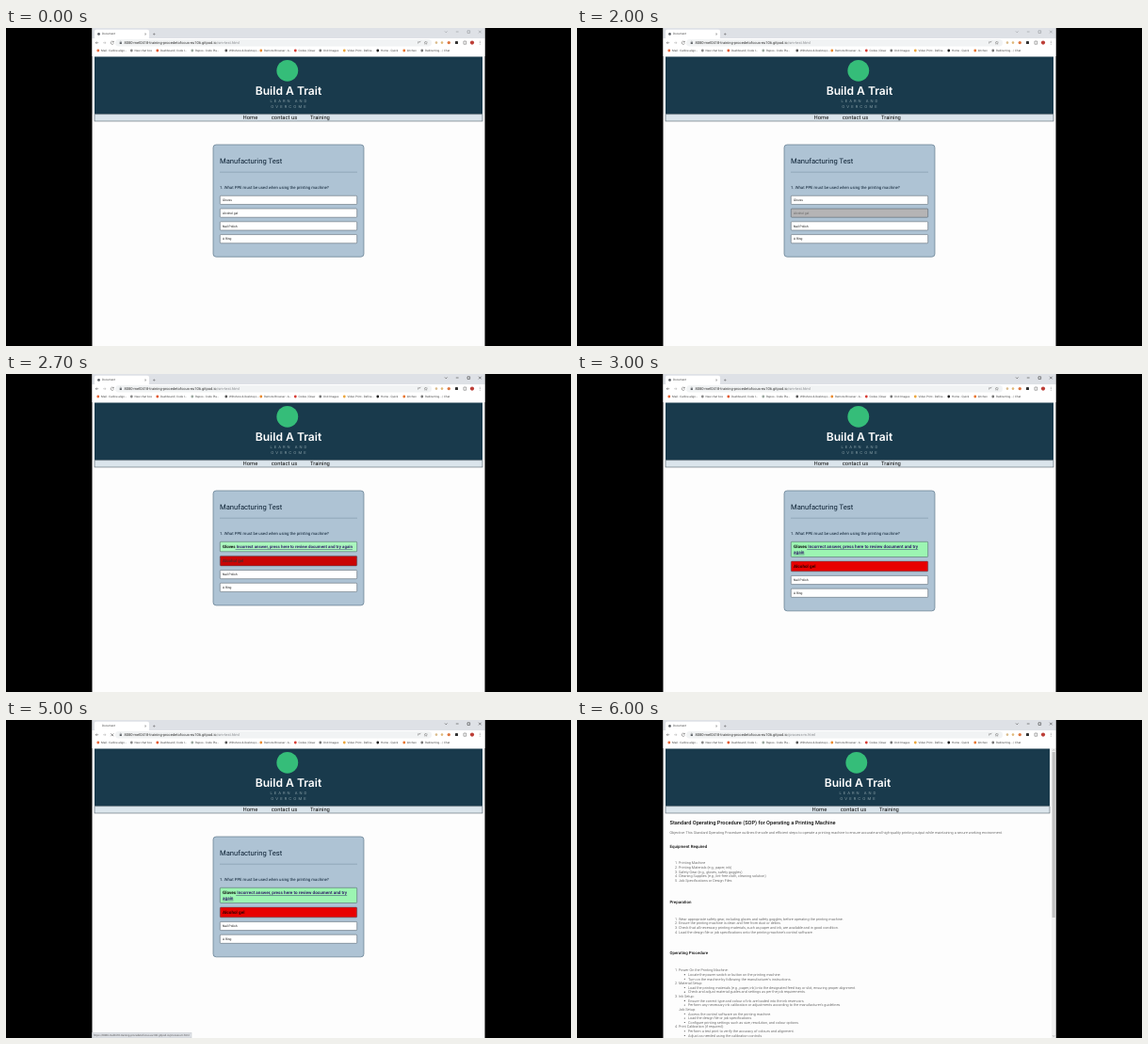
These frames come from a looping animation (600x338 px, 7.4 s). An HTML page:

```html
<!DOCTYPE html>
<html lang="en">
<head>
<meta charset="utf-8">
<title>Training quiz</title>
<style>
  html, body { margin: 0; width: 100%; height: 100%; overflow: hidden; background: #000; }
  svg { display: block; width: 100vw; height: 100vh; font-family: Roboto, sans-serif; text-rendering: geometricPrecision; white-space: pre; }
</style>
</head>
<body>
<svg id="stage" viewBox="0 0 600 338"></svg>
<script>
const LOOP = 7400, STEP = 100;
const HOST = "8080-mel0418-training-procedetofocus-eu106.gitpod.io";
const stage = document.getElementById("stage");

const rect = (x, y, w, h, fill, extra = "") =>
  `<rect x="${x}" y="${y}" width="${w}" height="${h}" fill="${fill}" ${extra}/>`;
const dot = (x, y, r, fill) => `<circle cx="${x}" cy="${y}" r="${r}" fill="${fill}"/>`;
const text = (x, y, size, fill, content, extra = "") =>
  `<text x="${x}" y="${y}" font-size="${size}" fill="${fill}" ${extra}>${content}</text>`;
const line = (d, stroke, width = 0.6) =>
  `<path d="${d}" fill="none" stroke="${stroke}" stroke-width="${width}"/>`;

const clamp = v => Math.max(0, Math.min(1, v));
const mix = (a, b, p) => a + (b - a) * p;
const mixColor = (a, b, p) => `rgb(${a.map((v, i) => Math.round(mix(v, b[i], p)))})`;

// CSS "ease": cubic-bezier(.25, .1, .25, 1)
function ease(x) {
  if (x <= 0 || x >= 1) return clamp(x);
  const bezier = (a, b, s) => 3 * a * s * (1 - s) ** 2 + 3 * b * s * s * (1 - s) + s ** 3;
  let low = 0, high = 1;
  for (let i = 0; i < 24; i++) {
    const mid = (low + high) / 2;
    if (bezier(0.25, 0.25, mid) < x) low = mid; else high = mid;
  }
  return bezier(0.1, 1, low);
}

const bookmarks = [
  [96, "#e8683a", "Mail - Carline align..."], [131.5, "#888", "New chat box"],
  [159, "#e2572b", "Dashboard | Code I..."], [196, "#9aa89f", "Repos - Code Pla..."],
  [232, "#555", "Wiltshore &amp; Desktop L..."], [269, "#e98a2e", "Remote Browser - A..."],
  [305.5, "#d63a32", "Codes | Draw"], [332, "#777", "Unit Images"],
  [357.5, "#eba53a", "Video Print - Define..."], [393, "#222", "Home - Quick"],
  [421, "#e8742c", "kitchen"], [440, "#777", "Redirecting... | Chat"]
];

function browser(t) {
  const active = t >= 2400, loading = t >= 5000 && t < 5100;
  const ink = active ? "#222" : "#85888c";
  const path = t >= 5100 ? "process-m.html" : "sm-test.html";
  const reload = loading
    ? line("M111.4 14.4l2.8 2.8m0-2.8l-2.8 2.8", "#444")
    : line("M114 14.7a1.6 1.6 0 1 0 .3 1.6M114.4 13.8v1.3h-1.3", "#555", 0.5);
  return rect(91.5, 0, 417, 338, "#fdfdfd") +
    rect(91.5, 0, 417, 11, "#dee1e6") +
    rect(94, 1.8, 58, 10, "#fff", 'rx="1.8"') +
    (loading ? "" : dot(98.5, 6.4, 1.4, "#5f6368")) +
    text(102, 7.3, 3.05, "#444", "Document") +
    line("M147.2 5.6l1.8 1.8m0-1.8l-1.8 1.8M156 6.5h2.6m-1.3-1.3v2.6", "#555", 0.4) +
    line("M466 3.5l1.3 1.3 1.3-1.3M477.8 4h2.8M490 2.8h2.6v2.6h-2.6zM502 2.7l2.7 2.7m0-2.7l-2.7 2.7", ink, 0.5) +
    rect(91.5, 11, 417, 19, "#fff") +
    rect(116, 12, 336, 7.4, "#f1f3f4", 'rx="3.7"') +
    line("M98.2 15.7h-3m1.3-1.3l-1.3 1.3 1.3 1.3", "#555", 0.5) +
    line("M103 15.7h3m-1.3-1.3l1.3 1.3-1.3 1.3", "#aaa", 0.5) + reload +
    rect(120.7, 15.2, 2.2, 1.8, "#5f6368") + line("M121.2 15.2v-.7a.6.6 0 0 1 1.2 0v.7", "#5f6368", 0.4) +
    text(125.5, 16.9, 4, "#333", `${HOST}<tspan fill="#85888c">/${path}</tspan>`) +
    line("M437.5 16.7v-2h2.6M438.5 15.8l2-2M445.8 14l.5 1.1 1.2.1-.9.8.3 1.2-1.1-.6-1.1.6.3-1.2-.9-.8 1.2-.1z", "#666", 0.4) +
    dot(457, 15.6, 1.3, "#d9bb8b") + dot(463, 15.6, 1.3, "#e0b878") +
    dot(470.3, 15.6, 1.7, "#dc7742") + rect(477, 14, 3, 3, "#333", 'rx=".6"') +
    line("M486 14h2.7v3.2h-2.7z", "#555", 0.5) + dot(495, 15.6, 2.1, "#bc3e37") +
    dot(503.2, 14.1, 0.4, "#444") + dot(503.2, 15.6, 0.4, "#444") + dot(503.2, 17.1, 0.4, "#444") +
    bookmarks.map(([x, color, label]) =>
      dot(x + 1.8, 24, 1.4, color) + text(x + 5, 25, 3.05, "#444", label)).join("");
}

function header(right) {
  const center = (94 + right) / 2, width = right - 94;
  const middle = 'text-anchor="middle" font-family="Inter, sans-serif"';
  return rect(94, 30.5, width, 61, "#193a4c") +
    dot(center - 1.2, 45.3, 11.4, "#35bd79") +
    text(center, 71, 12.1, "#fff", "Build A Trait", `${middle} font-weight="600"`) +
    text(center + 1, 79, 4, "#8ba1a8", "LEARN AND", `${middle} letter-spacing="2"`) +
    text(center + 1, 84.5, 4, "#8ba1a8", "OVERCOME", `${middle} letter-spacing="2.1"`) +
    rect(94, 91.8, width, 7.2, "#dbe5ec", 'stroke="#34444f" stroke-width=".5"') +
    [[-48.5, "Home"], [-18.2, "contact us"], [23, "Training"]]
      .map(([dx, label]) => text(center + dx, 97.4, 5.85, "#111", label)).join("");
}

function quiz(t) {
  const hover = clamp((t - 1900) / 300);
  const answered = t >= 2400;
  const p = ease((t - 2400) / 550);
  const white = [255, 255, 255], black = [33, 31, 32];
  const bigSize = mix(3.3, 4.65, p);
  const wraps = answered && bigSize > 4.46;
  const link = words => `<tspan fill="#33256b" text-decoration="underline">${words}</tspan>`;
  const message = " Incorrect answer, press here to review document and try";

  const options = [
    { lines: ["Gloves"], fill: mixColor(white, [156, 245, 178], p), ink: "#111", big: answered },
    { lines: ["Alcohol gel"], big: answered,
      fill: answered ? mixColor(black, [232, 0, 0], p) : mixColor(white, black, hover),
      ink: answered ? mixColor(white, [50, 0, 0], p) : mixColor([17, 17, 17], white, hover) },
    { lines: ["Nail Polish"], fill: "#fff", ink: "#111" },
    { lines: ["A Ring"], fill: "#fff", ink: "#111" }
  ];
  if (answered) {
    options[0].lines = wraps
      ? ["Gloves" + link(message), link("again")]
      : ["Gloves" + link(message + " again")];
  }

  const gap = 4.6, padding = 5.3;
  let y = 178.3, list = "";
  for (const { lines, fill, ink, big } of options) {
    const size = big ? bigSize : 3.3, leading = size * 1.17;
    const height = padding + lines.length * leading;
    list += rect(227.3, y, 145.4, height, fill, 'rx=".8" stroke="#44535f" stroke-width=".5"');
    lines.forEach((words, i) => {
      list += text(230, y + padding / 2 + leading * i + size * 0.93, size, ink, words, big ? 'font-weight="700"' : "");
    });
    y += height + gap;
  }
  const bottom = y - gap + 14.5;
  return rect(220, 124, 160, bottom - 124, "#aec3d4", 'rx="3.2" stroke="#5f798c" stroke-width=".7"') +
    text(227, 143.9, 7.65, "#0b2033", "Manufacturing Test") +
    line("M227 153.2H373", "#72899a", 0.5) +
    text(227, 171, 4.32, "#0b2033", "1. What PPE must be used when using the printing machine?") + list;
}

const equipment = ["1. Printing Machine", "2. Printing Materials (e.g., paper, ink)",
  "3. Safety Gear (e.g., gloves, safety goggles)",
  "4. Cleaning Supplies (e.g., lint-free cloth, cleaning solution)", "5. Job Specifications or Design Files"];
const preparation = [
  "1. Wear appropriate safety gear, including gloves and safety goggles, before operating the printing machine.",
  "2. Ensure the printing machine is clean and free from dust or debris.",
  "3. Check that all necessary printing materials, such as paper and ink, are available and in good condition.",
  "4. Load the design file or job specifications onto the printing machine's control software."];
const operation = ["1. Power On the Printing Machine:",
  "- Locate the power switch or button on the printing machine.",
  "- Turn on the machine by following the manufacturer's instructions.",
  "2. Material Setup:",
  "- Load the printing materials (e.g., paper, ink) into the designated feed tray or slot, ensuring proper alignment.",
  "- Check and adjust material guides and settings as per the job requirements.",
  "3. Ink Setup:",
  "- Ensure the correct type and colour of ink are loaded into the ink reservoirs.",
  "- Perform any necessary ink calibration or adjustments according to the manufacturer's guidelines.",
  "   Job Setup:",
  "- Access the control software on the printing machine.",
  "- Load the design file or job specifications.",
  "- Configure printing settings such as size, resolution, and colour options.",
  "4. Print Calibration (if required):",
  "- Perform a test print to verify the accuracy of colours and alignment.",
  "- Adjust as needed using the calibration controls."];

const body = (x, y, words) => text(x, y, 3.84, "#333", words, 'font-weight="300"');
const heading = (y, words, size = 4.4) => text(98.5, y, size, "#111", words, 'font-weight="500"');

function list(y, items) {
  return items.map((item, i) => {
    const base = y + i * 4.63, words = item.slice(2).trim();
    return item[0] === "-"
      ? dot(114.3, base - 1.3, 0.55, "#333") + body(118, base, words)
      : body(104, base, item.slice(0, 2)) + body(108, base, words);
  }).join("");
}

function procedure() {
  return heading(110.9, "Standard Operating Procedure (SOP) for Operating a Printing Machine", 5.65) +
    body(98.5, 120.8, "Objective: This Standard Operating Procedure outlines the safe and efficient steps to operate a printing machine to ensure accurate and high-quality printing output while maintaining a secure working environment.") +
    heading(135.5, "Equipment Required") + list(153.3, equipment) +
    heading(194.5, "Preparation") + list(212.7, preparation) +
    heading(249.4, "Operating Procedure") + list(267.3, operation) +
    rect(504, 30, 4.5, 308, "#f1f1f1") + rect(504.6, 34, 3.2, 176, "#c1c1c1") +
    line("M505.2 32.6l1-1 1 1M505.2 335.4l1 1 1-1", "#666", 0.5);
}

function status(t) {
  if (t < 4200 || t >= 5500) return "";
  return `<g opacity="${t < 5400 ? 1 : 0.5}">` + rect(91.5, 332.3, 105.5, 5.7, "#dee1e6", 'stroke="#bfc3c8" stroke-width=".4"') +
    text(93, 336.3, 2.9, "#555", `https://${HOST}/process-m.html`) + "</g>";
}

function render(t) {
  const reading = t >= 5100;
  stage.innerHTML = browser(t) + header(reading ? 502 : 506) +
    (reading ? procedure() : quiz(t)) + status(t);
}

let shown = -1;
function tick() {
  const t = Math.floor(performance.now() % LOOP / STEP) * STEP;
  if (t !== shown) render(shown = t);
  requestAnimationFrame(tick);
}
tick();
</script>
</body>
</html>
```
